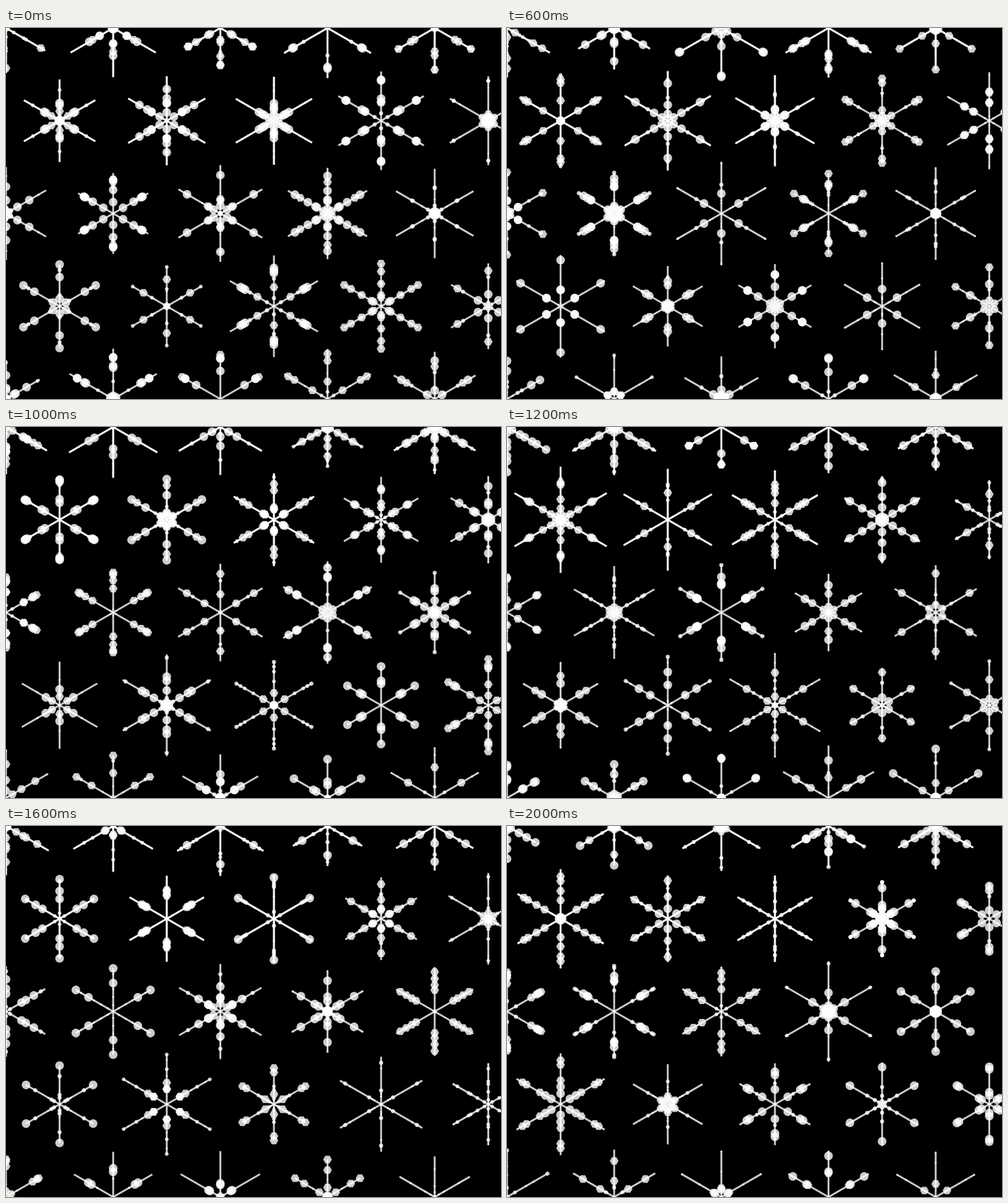
These frames come from a looping animation (800 by 600 pixels, 2200 ms). An HTML page with a canvas:

```html
<!DOCTYPE html>
<html lang="en">
<head>
<meta charset="utf-8">
<title>Snowflakes</title>
<style>
html, body { margin: 0; width: 100%; height: 100%; overflow: hidden; background: #000; }
canvas { display: block; }
</style>
</head>
<body>
<canvas id="stage" width="800" height="600"></canvas>
<script>
const ctx = document.getElementById('stage').getContext('2d');
const STEP = 200, STEPS = 11;
const ROW = 150, COL = ROW * 2 / Math.sqrt(3);
const GRID = 5;
const TAU = Math.PI * 2;
const INK = 'rgba(255,255,255,0.8)';

function seeded(seed) {
  let a = Math.imul(seed + 1, 0x9E3779B1);
  return () => {
    a = (a + 0x6D2B79F5) | 0;
    let t = Math.imul(a ^ (a >>> 15), a | 1);
    t ^= t + Math.imul(t ^ (t >>> 7), t | 61);
    return ((t ^ (t >>> 14)) >>> 0) / 4294967296;
  };
}

function beadPath(x, r, hex) {
  ctx.beginPath();
  if (!hex) {
    ctx.arc(x, 0, r, 0, TAU);
    return;
  }
  // Corners point sideways from the arm.
  for (let k = 0; k < 6; k++) {
    const a = (k + 0.5) * TAU / 6;
    ctx.lineTo(x + r * Math.cos(a), r * Math.sin(a));
  }
  ctx.closePath();
}

// Flakes grow sparser and fainter from the first to the last.
function makeFlake(step, index) {
  const rand = seeded(step * GRID * GRID + index);
  const reach = 73 + (rand() + rand() - 1) * 16;
  const mainHex = rand() < 0.5;
  const count = Math.round(8 - index * 0.18 + rand() * 2);
  const tipped = rand() < 0.5;
  const beads = [];
  let length = reach;
  for (let k = 0; k < count; k++) {
    const u = rand();
    const r = u < 0.45 ? 7 : u < 0.75 ? 3.3 : 1.7;
    const hex = rand() < 0.9 ? mainHex : !mainHex;
    let x = rand() * (reach - r);
    if (k === 0 && tipped) length = x = reach - r;
    beads.push({ x, r, hex });
  }
  return { length, beads, passes: index < 8 ? 2 : 1 };
}

function drawFlake(x, y, flake) {
  for (let arm = 0; arm < 6; arm++) {
    ctx.save();
    ctx.translate(x, y);
    ctx.rotate((arm + 0.5) * TAU / 6);
    for (let p = 0; p < flake.passes; p++) {
      ctx.beginPath();
      ctx.moveTo(0, 0);
      ctx.lineTo(flake.length, 0);
      ctx.stroke();
    }
    for (const b of flake.beads) {
      beadPath(b.x, b.r, b.hex);
      ctx.fill();
    }
    ctx.restore();
  }
}

function drawStep(step) {
  ctx.fillStyle = '#000';
  ctx.fillRect(0, 0, 800, 600);
  ctx.fillStyle = ctx.strokeStyle = INK;
  ctx.lineWidth = 3;
  for (let row = 0; row < GRID; row++) {
    for (let col = 0; col < GRID; col++) {
      const x = (col + (row % 2) / 2) * COL;
      drawFlake(x, row * ROW, makeFlake(step, row * GRID + col));
    }
  }
}

let shown = -1;
function tick() {
  const step = Math.floor(performance.now() / STEP) % STEPS;
  if (step !== shown) drawStep(shown = step);
  requestAnimationFrame(tick);
}
tick();
</script>
</body>
</html>
```
